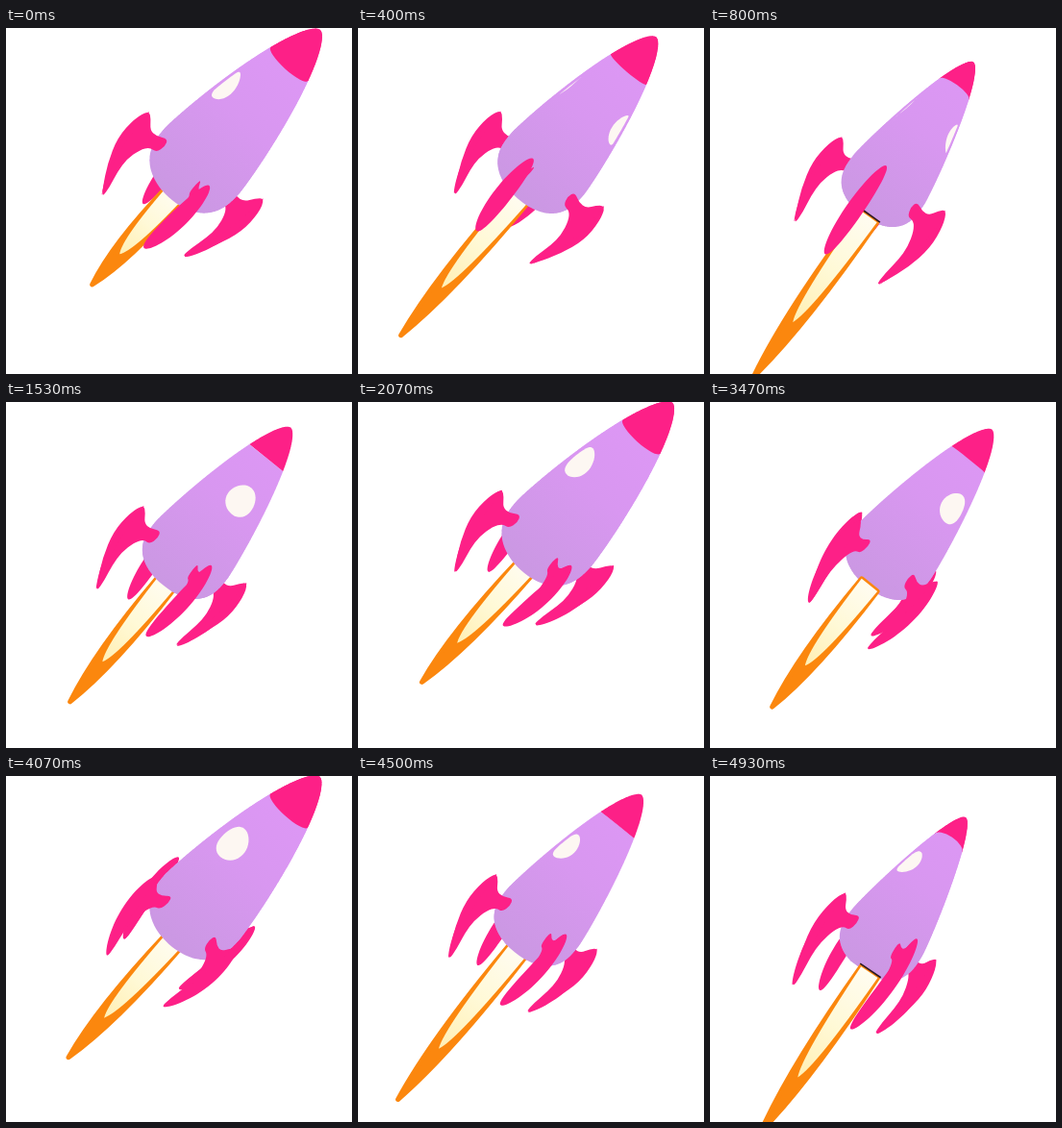
Recreate the animation shown at these times as an HTML page with a canvas. Size 360 by 360 pixels, loop 5 s.

```html
<!DOCTYPE html>
<html lang="en">
<head>
<meta charset="utf-8">
<title>Rocket</title>
<style>
html, body { margin: 0; width: 100%; height: 100%; overflow: hidden; background: #fff; }
canvas { display: block; width: 360px; height: 360px; }
</style>
</head>
<body>
<canvas id="stage" width="360" height="360"></canvas>
<script>
const ctx = document.getElementById('stage').getContext('2d');
const LOOP = 5000, TAU = Math.PI * 2, RAD = Math.PI / 180;
const PINK = '#fd2087', ORANGE = '#fb870e';
const LENGTH = 210, CAP = 169, WINDOW = 119;

// Fin outline: distance from the axis, height above the nozzle.
const FIN = [
  [72, 53], [78, 38], [79, 12], [70, -16], [58, -39], [52, -48], [53, -34],
  [57, -16], [58, 0], [54, 16], [48, 24], [40, 24], [37, 34], [40, 42],
  [50, 37], [59, 38], [65, 47]
];

// Quadratic through the values at u = -1, 0 and 1.
const blend = (u, low, mid, high) =>
  mid + u * (high - low) / 2 + u * u * ((high + low) / 2 - mid);

function radius(y) {
  if (y >= 45) return 47.5 * Math.pow(1 - Math.pow((y - 45) / 165, 1.2), 0.6);
  return 47.5 * Math.pow(1 - Math.pow((45 - y) / 46.5, 3), 0.45);
}

function poseAt(t) {
  const wave = peak => Math.cos(TAU * (t - peak) / 1970);
  const u = wave(55), v = wave(110);
  const angle = blend(u, 55.8, 51, 47.9) * RAD;
  const len = blend(u, 190, 209, 230);
  const grow = blend(u, -0.0009, 0, 0.0004);
  const spin = -47 - 0.081 * t + 30 * Math.cos(TAU * (t / 2000 - 0.58));
  return {
    u, angle, grow,
    spin: spin * RAD,
    x: 296.5 + 31 * u - len * Math.cos(angle),
    y: 22.5 - 22 * v + len * Math.sin(angle),
    stretch: len / LENGTH * (1 - grow * LENGTH),
    width: blend(u, 0.98, 1.01, 1.06),
    taper: blend(u, -0.0013, -0.0001, 0.0006),
    tailTilt: blend(u, -0.05, -0.14, -0.32),
    noseTilt: blend(u, 0.34, 0, -0.3),
    near: 0.0004,
    flame: 181 + 28 * Math.cos(TAU * (t / 2000 - 0.38))
      - 32 * Math.pow(Math.cos(Math.PI * t / 957), 20),
    flameShift: blend(u, 8, 1, 1.5)
  };
}

const sideScale = (p, y) => p.width + p.taper * y;
const along = (p, y) => p.stretch * y / (1 - p.grow * y);
const tiltAt = (p, y) => p.tailTilt + (p.noseTilt - p.tailTilt) * y / CAP;

// Point on the rocket (side, height, towards viewer) to the tilted plane.
function project(p, x, y, z) {
  const d = 1 - p.near * z;
  return [sideScale(p, y) * x / d, along(p, y) + tiltAt(p, y) * z];
}

function smooth(pts) {
  const mid = (a, b) => [(a[0] + b[0]) / 2, (a[1] + b[1]) / 2];
  ctx.beginPath();
  ctx.moveTo(...mid(pts[pts.length - 1], pts[0]));
  pts.forEach((q, i) => ctx.quadraticCurveTo(...q, ...mid(q, pts[(i + 1) % pts.length])));
  ctx.closePath();
}

// Solid of revolution: its flat outline joined with its tilted rings.
function hull(p, from, to, fill) {
  const left = [], right = [];
  ctx.fillStyle = fill;
  ctx.beginPath();
  for (let y = from; y <= to; y++) {
    const r = radius(y), a = along(p, y), rx = r * sideScale(p, y);
    left.push([-rx, a]);
    right.unshift([rx, a]);
    ctx.moveTo(rx, a);
    ctx.ellipse(0, a, rx, r * Math.abs(tiltAt(p, y)), 0, 0, TAU);
  }
  ctx.fill();
  ctx.beginPath();
  left.concat(right).forEach(q => ctx.lineTo(...q));
  ctx.fill();
}

function fin(p, ang) {
  const s = Math.sin(ang), c = Math.cos(ang);
  ctx.fillStyle = PINK;
  smooth(FIN.map(([r, y]) => project(p, r * s, y, r * c)));
  ctx.fill();
  // Thickness of the blade, seen when it faces the viewer.
  const edge = [];
  for (let i = 0; i < 32; i++) {
    const a = TAU * i / 32, k = (1 - Math.cos(a)) / 2;
    const r = 71 - 17 * k * k + 14 * k * (1 - k), w = 9 * Math.sin(a);
    edge.push(project(p, r * s + w * c, 52 - 98 * k, r * c - w * s));
  }
  smooth(edge);
  ctx.fill();
}

function tongue(half, bulge, bend, len) {
  ctx.beginPath();
  ctx.moveTo(-half, 1);
  ctx.quadraticCurveTo(-bulge, -len * bend, 0, -len);
  ctx.quadraticCurveTo(bulge, -len * bend, half, 1);
  ctx.closePath();
}

function flame(p) {
  ctx.save();
  ctx.translate(p.flameShift, 0);
  ctx.lineJoin = 'round';
  ctx.lineWidth = 5;
  ctx.fillStyle = ctx.strokeStyle = ORANGE;
  tongue(10.5, 13, 0.64, p.flame - 2.5);
  ctx.fill();
  ctx.stroke();
  const core = p.flame * 0.65;
  const g = ctx.createLinearGradient(0, 0, 0, -core);
  g.addColorStop(0, '#fffcf0');
  g.addColorStop(0.5, '#fff9d6');
  g.addColorStop(1, '#ffefb4');
  ctx.fillStyle = g;
  tongue(10.5, 9, 0.85, core);
  ctx.fill();
  if (p.u < -0.3) {
    ctx.strokeStyle = '#2b1a26';
    ctx.lineWidth = 1.6;
    ctx.beginPath();
    ctx.moveTo(-13, 3);
    ctx.lineTo(13, 3);
    ctx.stroke();
  }
  ctx.restore();
}

function porthole(p, spin) {
  const ang = spin - 10 * RAD * Math.sin(2 * spin);
  const turn = Math.atan2(Math.sin(ang), Math.cos(ang));
  if (Math.abs(turn) > 1.95) return;
  ctx.beginPath();
  for (let i = 0; i < 40; i++) {
    const a = TAU * i / 40, y = WINDOW + 16.5 * Math.sin(a), r = radius(y) * 0.93;
    const w = turn + 16.5 * Math.cos(a) / 34;
    const f = Math.max(-Math.PI / 2, Math.min(Math.PI / 2, w));
    ctx.lineTo(...project(p, r * Math.sin(f), y, r * Math.cos(f)));
  }
  ctx.fillStyle = '#fdf7f2';
  ctx.fill();
}

function bodyFill() {
  const g = ctx.createLinearGradient(0, 0, 0, 190);
  g.addColorStop(0, '#cb98e3');
  g.addColorStop(0.55, '#d897f0');
  g.addColorStop(1, '#dd97f5');
  return g;
}

function draw(t) {
  const p = poseAt(t);
  ctx.setTransform(1, 0, 0, 1, 0, 0);
  ctx.fillStyle = '#fff';
  ctx.fillRect(0, 0, 360, 360);
  // Local axes: across the rocket and along it towards the nose.
  const s = Math.sin(p.angle), c = Math.cos(p.angle);
  ctx.setTransform(s, c, c, -s, p.x, p.y);

  const fins = [0, 1, 2, 3].map(i => p.spin + i * Math.PI / 2);
  const front = a => Math.cos(a) > 0;
  fins.filter(a => !front(a)).forEach(a => fin(p, a));

  if (p.u > -0.1) flame(p);
  const body = () => hull(p, 0, CAP, bodyFill());
  const cap = () => hull(p, CAP, LENGTH, PINK);
  (p.noseTilt > 0 ? [cap, body] : [body, cap]).forEach(part => part());
  porthole(p, p.spin);
  porthole(p, p.spin + Math.PI);
  if (p.u <= -0.1) flame(p);

  fins.filter(front).sort((a, b) => Math.cos(a) - Math.cos(b)).forEach(a => fin(p, a));
}

const start = performance.now();
function tick() {
  draw((performance.now() - start) % LOOP);
  requestAnimationFrame(tick);
}
tick();
</script>
</body>
</html>
```
